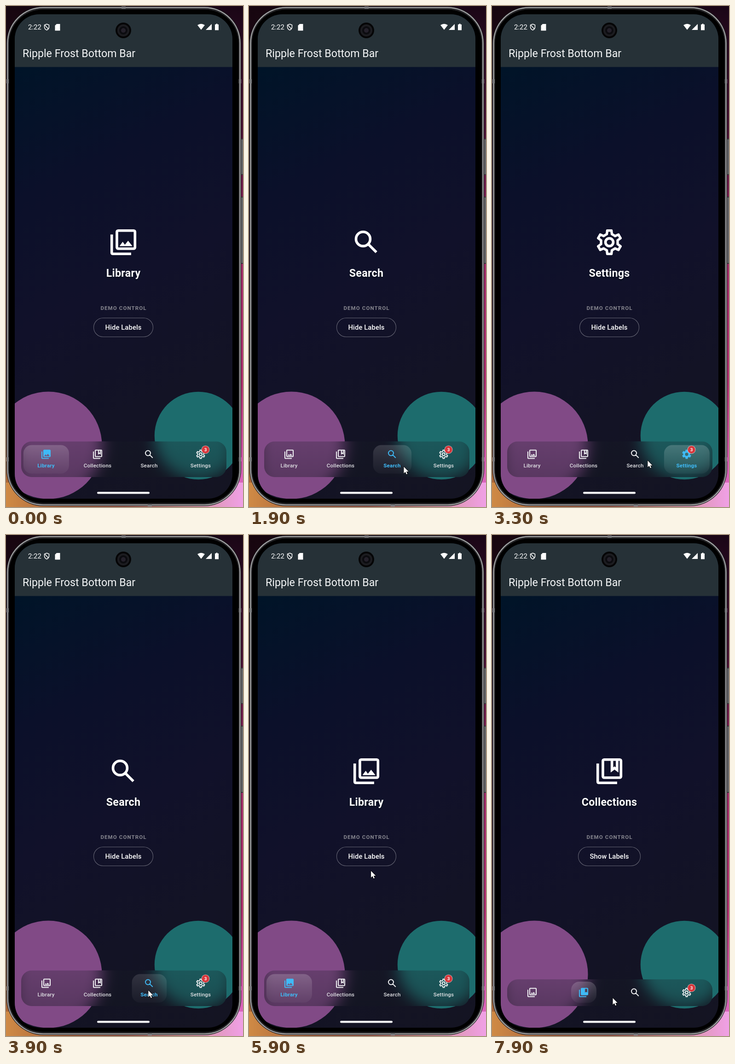
These frames come from a looping animation (515x1088 px, 8 s). An HTML page with a canvas:

```html
<!DOCTYPE html>
<html lang="en">
<head>
<meta charset="utf-8">
<title>Bottom bar</title>
<style>
html, body { margin: 0; width: 100%; height: 100%; overflow: hidden; background: #12050f; }
canvas { display: block; width: 515px; height: 1088px; }
</style>
</head>
<body>
<canvas id="stage" width="515" height="1088"></canvas>
<script>
const W = 515, H = 1088, LOOP = 8000, STEP = 100;
const ctx = document.getElementById('stage').getContext('2d');
const FONT = 'Roboto, "Noto Sans", sans-serif';
const BLUE = '#3fbaf6';
const names = ['Library', 'Collections', 'Search', 'Settings'];
const tabX = i => 87 + 112 * i;

// Pointer stops: each ends in a press of a tab, of the button, or of nothing.
const stops = [
  { at: 100, leave: 200, x: 330, y: 1078 },
  { at: 600, leave: 800, x: 222, y: 990, tab: 1 },
  { at: 1400, leave: 1800, x: 303, y: 1000, tab: 2 },
  { at: 2100, leave: 2100, x: 430, y: 1000 },
  { at: 2300, leave: 2700, x: 406, y: 983, tab: 3 },
  { at: 3600, leave: 3840, x: 314, y: 988, tab: 2 },
  { at: 4300, leave: 4600, x: 203, y: 1000, tab: 1 },
  { at: 5100, leave: 5300, x: 68, y: 990, tab: 0 },
  { at: 6040, leave: 6220, x: 285, y: 702, button: true },
  { at: 6900, leave: 6950, x: 145, y: 963 },
  { at: 7300, leave: 7600, x: 222, y: 998, tab: 1 },
  { at: 7900, leave: 8000, x: 262, y: 1005 }
];
const pressTime = s => s.leave - 70;
const toggle = pressTime(stops.find(s => s.button));

const smooth = v => { v = Math.max(0, Math.min(1, v)); return v * v * (3 - 2 * v); };
const mix = (a, b, k) => a + (b - a) * k;

function ramp(g, x0, y0, x1, y1, ...cols) {
  const r = g.createLinearGradient(x0, y0, x1, y1);
  cols.forEach((c, i) => r.addColorStop(i / (cols.length - 1), c));
  return r;
}

function box(g, x, y, w, h, r) {
  g.beginPath();
  g.roundRect(x, y, w, h, r);
}

function disc(g, x, y, r, color) {
  g.beginPath();
  g.arc(x, y, r, 0, 7);
  g.fillStyle = color;
  g.fill();
}

function text(g, s, x, y, size, weight, color, align = 'center', gap = 0) {
  g.font = `${weight} ${size}px ${FONT}`;
  g.textAlign = align;
  g.letterSpacing = gap + 'px';
  g.fillStyle = color;
  g.fillText(s, x, y);
}

// Icons live on a 24 unit grid.
function stack(hollow, detail) {
  const p = new Path2D('M2 6v14q0 2 2 2h14v-2H4V6z' + detail);
  p.roundRect(6, 2, 16, 16, 2);
  if (hollow) p.rect(8, 4, 12, 12);
  return p;
}

function makeGear() {
  const p = new Path2D();
  const half = [[2, -10], [2.5, -9.5], [2.85, -6.85]];
  const tooth = [...half.map(([x, y]) => [-x, y]).reverse(), ...half];
  for (let a = 0; a < 6; a++) {
    const c = Math.cos(a * Math.PI / 3), s = Math.sin(a * Math.PI / 3);
    for (const [x, y] of tooth) p.lineTo(12 + x * c - y * s, 12 + x * s + y * c);
  }
  p.closePath();
  return p;
}

const gear = makeGear();
const ring = (r, p = new Path2D()) => { p.arc(12, 12, r, 0, 7); return p; };
const stacks = [
  [stack(true, 'M11.5 11.67l1.69 2.26 2.48-3.1L19 15H9z'), stack(false, 'M11 12l2 2.7L16 11l4 5H8z')],
  [stack(true, 'M13 4v9l3-2.25L19 13V4zM15 4v5l1-.75L17 9V4z'), stack(false, 'M20 12l-2.5-1.5L15 12V4h5z')]
];

function drawIcon(i, x, y, scale, on, color) {
  ctx.save();
  ctx.translate(x, y);
  ctx.scale(scale, scale);
  ctx.translate(-12, -12);
  ctx.fillStyle = ctx.strokeStyle = color;
  ctx.lineWidth = 2;
  if (i < 2) {
    ctx.fill(stacks[i][+on], 'evenodd');
  } else if (i === 2) {
    ctx.beginPath();
    ctx.arc(9.5, 9.5, 5.5, 0, 7);
    ctx.moveTo(13.6, 13.6);
    ctx.lineTo(19.75, 19.75);
    ctx.stroke();
  } else if (on) {
    ctx.fill(ring(3.5, new Path2D(gear)), 'evenodd');
  } else {
    ctx.stroke(ring(3));
    ctx.clip(gear);
    ctx.lineWidth = 3.8;
    ctx.stroke(gear);
  }
  ctx.restore();
}

function drawStatus(g) {
  text(g, '2:22', 48, 51, 15, 400, '#fff', 'left');
  g.strokeStyle = g.fillStyle = '#fff';
  g.lineWidth = 1.5;
  g.stroke(new Path2D('M88.5 39.3l5 2v4q0 5-5 7-5-2-5-7v-4zM85 42l6.5 7.5'));
  g.fill(new Path2D('M110 39h7.5v14.5h-11v-11z'));
  g.fill(new Path2D('M416 41.5Q424 36 432 41.5L424 51.8z'));
  g.fill(new Path2D('M434 52L447 39V52z'));
  g.fill(new Path2D('M456.5 38.5h3v1.5h2.5v12.5h-8V40h2.5z'));
}

function drawShell(g) {
  g.fillStyle = ramp(g, 0, 0, 0, H, '#17060f', '#220a1c', '#2a0b20', '#30101e', '#c97c3c');
  g.fillRect(0, 0, 260, H);
  g.fillStyle = ramp(g, 0, 0, 0, H, '#1a0616', '#4a1234', '#a02c68', '#b0306f', '#e572cf');
  g.fillRect(260, 0, 255, H);
  g.fillStyle = ramp(g, 0, 0, W, 0, '#cf8a45', '#a8623c', '#a05a48', '#d08f90', '#f0a0e6');
  g.fillRect(0, 1035, W, 53);

  for (const [y, h] of [[288, 79], [414, 146]]) {
    g.fillStyle = '#3c3c40';
    g.fillRect(510, y, 5, h);
    g.fillStyle = '#98989b';
    g.fillRect(512, y + 2, 1.5, h - 4);
  }

  box(g, 1, 1, 510, 1085, 80);
  g.fillStyle = '#1b1b1d';
  g.fill();
  box(g, 3.5, 3.5, 505, 1080, 77);
  g.lineWidth = 2.5;
  g.strokeStyle = '#a2a2a4';
  g.stroke();
  box(g, 6, 7, 500, 1073, 74);
  g.fillStyle = '#000';
  g.fill();
  g.lineWidth = 1;
  g.strokeStyle = '#3a3a3d';
  g.stroke();
  g.fillStyle = '#77787b';
  for (const y of [159, 980]) for (const x of [1, 506]) g.fillRect(x, y, 5, 9);
  g.fillRect(251, 1, 9, 5);
  g.fillRect(308, 1082, 9, 5);
}

function drawScreen(g) {
  g.save();
  box(g, 19, 18, 473, 1052, 54);
  g.clip();
  g.fillStyle = ramp(g, 19, 132, 492, 1070, '#001428', '#0b102a', '#11112a', '#131325', '#141422');
  g.fillRect(19, 18, 473, 1052);
  g.fillStyle = '#263137';
  g.fillRect(19, 18, 473, 114.5);
  disc(g, 92, 954, 116.5, '#814a86');
  disc(g, 418, 933, 95.3, '#1d6c6d');
  g.restore();
}

function drawCamera(g) {
  ['#050506', '#1c1c20', '#0c0c10', '#24202a'].forEach((c, i) => disc(g, 255, 53, 17 - 4 * i, c));
}

const base = document.createElement('canvas');
base.width = W;
base.height = H;
const baseCtx = base.getContext('2d');
drawShell(baseCtx);
drawScreen(baseCtx);
drawStatus(baseCtx);
drawCamera(baseCtx);
text(baseCtx, 'Ripple Frost Bottom Bar', 36, 111, 23.2, 400, '#f4f6f7', 'left');
text(baseCtx, 'DEMO CONTROL', 255.5, 660, 11.6, 600, '#86868f', 'center', 1.05);

function drawPage(sel, hidden, t) {
  drawIcon(sel, 255, 513, 2.81, false, '#fff');
  ctx.save();
  ctx.shadowColor = 'rgba(0,10,16,.8)';
  ctx.shadowBlur = 5;
  ctx.shadowOffsetY = 2;
  text(ctx, names[sel], 255, 588, 23.2, 700, '#fff', 'center', 0.3);
  ctx.restore();

  const half = hidden ? 67.5 : 64.5;
  box(ctx, 255 - half, 677.5, half * 2, 41, 20.5);
  ctx.fillStyle = hidden && t < 7100 ? 'rgba(24,44,58,.4)' : 'rgba(255,255,255,0)';
  ctx.fill();
  ctx.lineWidth = 1.1;
  ctx.strokeStyle = 'rgba(255,255,255,.34)';
  ctx.stroke();
  text(ctx, hidden ? 'Show Labels' : 'Hide Labels', 255, 703, 14.8, 500, '#fff', 'center', 0.1);
}

function drawBar(sel, grow, labels) {
  const top = mix(965, 945.5, labels), h = 1023 - top;
  ctx.save();
  box(ctx, 33, top, 446, h, 23);
  ctx.clip();
  ctx.filter = 'blur(16px)';
  ctx.drawImage(base, 0, 0);
  ctx.filter = 'none';
  ctx.fillStyle = ramp(ctx, 0, top, 0, 1023, 'rgba(24,29,38,.26)', 'rgba(20,24,32,.36)');
  ctx.fillRect(33, top, 446, h);
  ctx.restore();

  const w = mix(55, 99, labels) * mix(0.606, 1, grow);
  const py = mix(970, 953.5, labels), ph = mix(46, 62, labels);
  box(ctx, tabX(sel) + 0.4 - w / 2, py, w, ph, 18);
  const shine = [0.19, 0.11, 0.04].map(a => `rgba(255,255,255,${a * mix(0.45, 1, grow)})`);
  ctx.fillStyle = ramp(ctx, 0, py, 0, py + ph, ...shine);
  ctx.fill();

  const iy = mix(993.5, 973.5, labels);
  names.forEach((name, i) => {
    const on = i === sel;
    drawIcon(i, tabX(i), iy, 1, on, on ? BLUE : '#f2f3f5');
    ctx.globalAlpha = labels;
    text(ctx, name, tabX(i), 1002, 11.6, on ? 700 : 500, on ? BLUE : '#e2e3e6', 'center', 0.2);
    ctx.globalAlpha = 1;
  });
  disc(ctx, 433.5, iy - 10, 9, 'rgba(255,255,255,.7)');
  disc(ctx, 433.5, iy - 10, 8.2, '#d8373c');
  text(ctx, '3', 433.5, iy - 6.5, 9.8, 700, '#fff');
}

const arrow = new Path2D('M0 0V14.4L3.3 11.3 5.6 16.4 7.8 15.4 5.6 10.5H10.2z');
function drawPointer(t) {
  if (t < stops[0].leave) return;
  const next = stops.findIndex(s => s.at > t);
  const to = stops.at(next), from = next > 0 ? stops[next - 1] : to;
  const k = from === to ? 0 : smooth((t - from.leave) / (to.at - from.leave));
  ctx.save();
  ctx.translate(mix(from.x, to.x, k) + 0.5, mix(from.y, to.y, k) + 0.5);
  ctx.lineJoin = 'round';
  ctx.lineWidth = 1.6;
  ctx.strokeStyle = '#000';
  ctx.stroke(arrow);
  ctx.fillStyle = '#fff';
  ctx.fill(arrow);
  ctx.restore();
}

function draw(t) {
  const tap = stops.filter(s => s.tab >= 0 && pressTime(s) <= t).pop();
  const sel = tap ? tap.tab : 0;
  const grow = tap ? smooth((t - pressTime(tap)) / 300) : 1;
  ctx.drawImage(base, 0, 0);
  drawPage(sel, t >= toggle, t);
  drawBar(sel, grow, 1 - smooth((t - toggle) / 300));
  box(ctx, 198, 1055, 114, 4.6, 2.3);
  ctx.fillStyle = '#f6f6f8';
  ctx.fill();
  drawPointer(t);
}

function tick() {
  const t = performance.now() % LOOP;
  draw(Math.floor(t / STEP) * STEP);
  requestAnimationFrame(tick);
}
tick();
</script>
</body>
</html>
```
